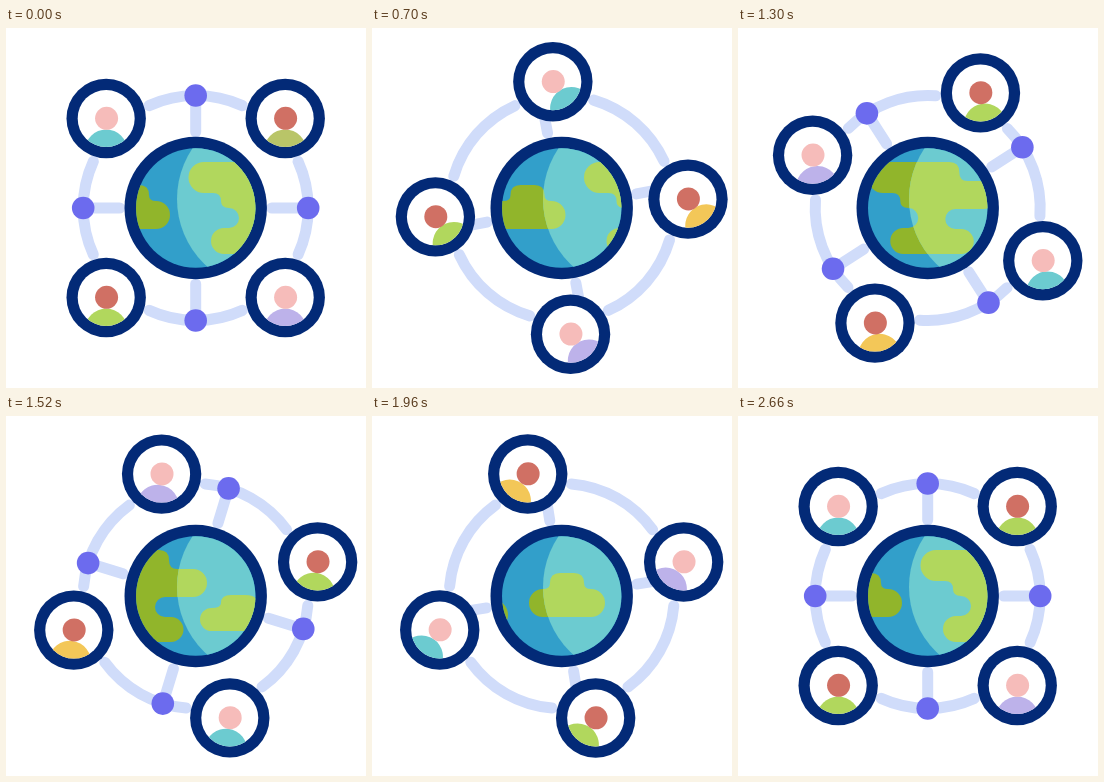
An HTML page with a canvas that plays this animation: 360 by 360 pixels, repeating every 3000 ms.

```html
<!DOCTYPE html>
<html lang="en">
<head>
<meta charset="utf-8">
<title>Connected world</title>
<style>
  html, body { margin: 0; width: 100%; height: 100%; overflow: hidden; background: #fff; }
  canvas { display: block; width: 360px; height: 360px; }
</style>
</head>
<body>
<canvas id="stage" width="360" height="360"></canvas>
<script>
const ctx = document.getElementById("stage").getContext("2d");
const LOOP = 3000, STEP = 20, RAD = Math.PI / 180;
const CX = 189.7, CY = 180;
const MAP_PERIOD = 318;
const NAVY = "#032a77", PALE = "#d0dcfa", VIOLET = "#6c6bee";
const PINK = "#f6bcba", RED = "#d07064";
const TEAL = "#6ccbd0", GREEN = "#b1d75d", LILAC = "#bdb2ea";

const land = new Path2D(
  // wide continent
  "M198 134H264Q274 134 274 144Q274 153 282 153H298A14 14 0 0 1 298 181H270" +
  "A10 10 0 0 0 270 201H276A12.5 12.5 0 0 1 276 226H218A13 13 0 0 1 218 200H223" +
  "A10 10 0 0 0 223 180Q215 180 215 173Q215 165 207 165H198A15.5 15.5 0 0 1 198 134Z" +
  // upper island
  "M102 173Q109 173 109 167Q109 157 119 157H133Q143 157 143 167Q143 173 150 173" +
  "A14 14 0 0 1 150 201H102A14 14 0 0 1 102 173Z" +
  // lower island
  "M316.5 192Q326 192 326 187Q326 179 336 179H350Q359 179 361 183H369" +
  "A16 16 0 0 1 369 215H316.5A11.5 11.5 0 0 1 316.5 192Z");

// Smooth curve through [time, value] keys, at rest at both ends.
function curve(keys) {
  const slope = i => (keys[i + 1][1] - keys[i][1]) / (keys[i + 1][0] - keys[i][0]);
  const tangents = keys.map((key, i) => {
    if (i === 0 || i === keys.length - 1) return 0;
    const before = key[0] - keys[i - 1][0], after = keys[i + 1][0] - key[0];
    return (after * slope(i - 1) + before * slope(i)) / (before + after);
  });
  return t => {
    if (t <= keys[0][0]) return keys[0][1];
    const i = keys.findIndex(key => key[0] >= t) - 1;
    if (i < 0) return keys[keys.length - 1][1];
    const [t0, a] = keys[i], [t1, b] = keys[i + 1];
    const h = t1 - t0, u = (t - t0) / h, v = 1 - u;
    return v * v * (1 + 2 * u) * a + u * u * (1 + 2 * v) * b
      + h * u * v * (v * tangents[i] - u * tangents[i + 1]);
  };
}

const dotTurn = curve([[200, 0], [700, -10.7], [1080, 12.8], [1520, 107],
  [1960, 171], [2340, 179], [2660, 180]]);
const avatarTilt = curve([[200, 0], [700, -35], [1080, -22], [1520, 7],
  [1960, 34], [2340, 29.5], [2660, 0]]);
const mapShift = curve([[200, 0], [700, 29.5], [1080, -7], [1520, -111],
  [1960, 69 - MAP_PERIOD], [2340, 7.5 - MAP_PERIOD], [2660, -MAP_PERIOD]]);

function orbitTurn(t) {
  const u = Math.min(1, Math.max(0, (t - 200) / 2380));
  return 360 * u * u * (3 - 2 * u);
}

function goldTone(t) {
  if (t < 220) return "#b9c568";
  if (t >= 2620) return "#b0d55c";
  if (t >= 2200) return "#f4b274";
  return t > 900 && t < 1260 ? "#bbc662" : "#f3c758";
}

function disc(x, y, r, color) {
  ctx.fillStyle = color;
  ctx.beginPath();
  ctx.arc(x, y, r, 0, 2 * Math.PI);
  ctx.fill();
}

function polar(radius, degrees) {
  return [CX + radius * Math.cos(degrees * RAD), CY + radius * Math.sin(degrees * RAD)];
}

function withClip(x, y, r, draw) {
  ctx.save();
  ctx.beginPath();
  ctx.arc(x, y, r, 0, 2 * Math.PI);
  ctx.clip();
  draw();
  ctx.restore();
}

function drawLinks(orbit, dots) {
  ctx.strokeStyle = PALE;
  ctx.lineWidth = 11;
  ctx.lineCap = "round";
  for (let a = 0; a < 360; a += 90) {
    ctx.beginPath();
    ctx.arc(CX, CY, 112.5, (orbit + a - 24.5) * RAD, (orbit + a + 24.5) * RAD);
    ctx.stroke();
    ctx.beginPath();
    ctx.moveTo(...polar(76, dots + a));
    ctx.lineTo(...polar(112.5, dots + a));
    ctx.stroke();
  }
  for (let a = 0; a < 360; a += 90) disc(...polar(112.5, dots + a), 11.3, VIOLET);
}

function drawAvatar(angle, tilt, skin, shirt) {
  const [x, y] = polar(126.6, angle);
  disc(x, y, 39.7, NAVY);
  disc(x, y, 28.5, "#fff");
  withClip(x, y, 28.5, () => {
    ctx.translate(x, y);
    ctx.rotate(tilt * RAD);
    disc(0, 32.2, 21.2, shirt);
  });
  disc(x + 0.4, y - 0.2, 11.5, skin);
}

function drawSurface(sea, ground, shift) {
  ctx.fillStyle = sea;
  ctx.fillRect(CX - 65, CY - 65, 130, 130);
  ctx.fillStyle = ground;
  for (const offset of [shift, shift + MAP_PERIOD]) {
    ctx.save();
    ctx.translate(offset, 0);
    ctx.fill(land);
    ctx.restore();
  }
}

function drawGlobe(shift) {
  disc(CX, CY, 71.2, NAVY);
  withClip(CX, CY, 59.7, () => {
    drawSurface("#329fca", "#91b52b", shift);
    withClip(262, 171, 91, () => drawSurface(TEAL, GREEN, shift));
  });
}

function render(t) {
  const orbit = orbitTurn(t), tilt = avatarTilt(t);
  ctx.fillStyle = "#fff";
  ctx.fillRect(0, 0, 360, 360);
  drawLinks(orbit, dotTurn(t));
  drawAvatar(225 + orbit, tilt, PINK, TEAL);
  drawAvatar(315 + orbit, tilt, RED, goldTone(t));
  drawAvatar(135 + orbit, tilt, RED, GREEN);
  drawAvatar(45 + orbit, tilt, PINK, LILAC);
  drawGlobe(mapShift(t));
}

const start = performance.now();
function tick() {
  const t = (performance.now() - start) % LOOP;
  render(Math.floor(t / STEP) * STEP);
  requestAnimationFrame(tick);
}
tick();
</script>
</body>
</html>
```
